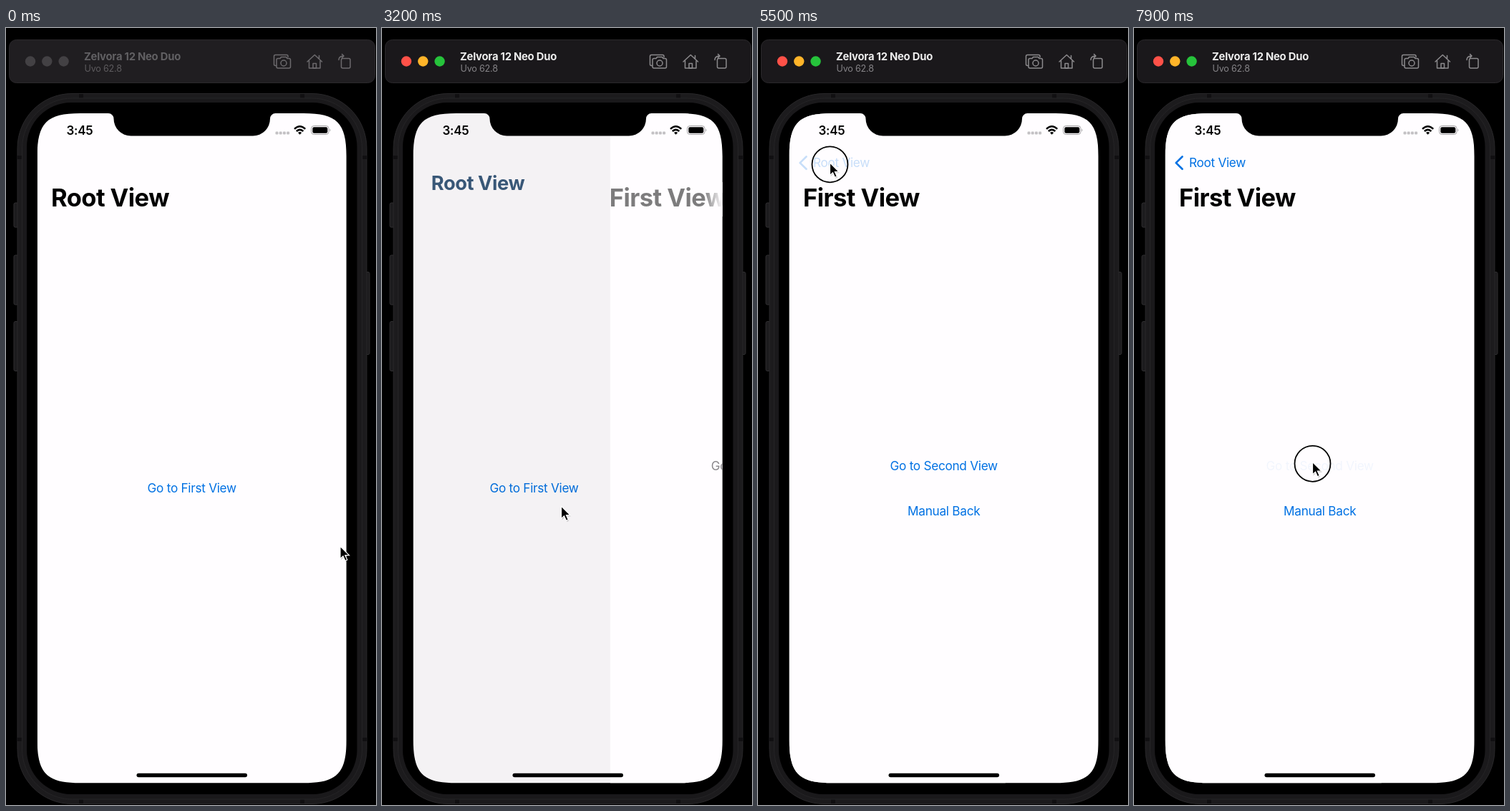
These frames come from a looping animation (517x1084 px, 8000 ms). An HTML page:

```html
<!DOCTYPE html>
<html lang="en">
<head>
<meta charset="utf-8">
<title>Navigation demo</title>
<style>
  html, body { margin: 0; width: 100%; height: 100%; overflow: hidden; background: #000; }
  svg { display: block; width: 517px; height: 1084px; }
  text { font-family: Inter, Roboto, sans-serif; font-size: 17.2px; letter-spacing: -.016em; }
  .link { fill: #0071e3; text-anchor: middle; }
  .large { font-size: 34.5px; font-weight: 700; }
  .icons { fill: none; stroke-width: 1.5; stroke-linejoin: round; stroke-linecap: round; }
</style>
</head>
<body>
<svg viewBox="0 0 517 1084">
  <defs>
    <clipPath id="screen">
      <path d="M43.700 179c0-46.700 13.300-60 60-60h312c46.700 0 60 13.300 60 60V993.300c0 46.700-13.300 60-60 60h-312c-46.700 0-60-13.300-60-60z"/>
    </clipPath>
    <linearGradient id="fade">
      <stop stop-color="#fffdff" stop-opacity="0"/>
      <stop offset="1" stop-color="#fffdff"/>
    </linearGradient>
  </defs>
  <rect width="517" height="1084"/>

  <!-- window bar -->
  <rect id="bar" x="4.500" y="16.500" width="511" height="60" rx="10" stroke="#2b292c"/>
  <g id="lights"><circle cx="34" cy="46.500" r="7.200"/><circle cx="57.300" cy="46.500" r="7.200"/><circle cx="80.600" cy="46.500" r="7.200"/></g>
  <text id="device" x="109" y="44.500" style="font-size:14.8px;font-weight:700">Zelvora 12 Neo Duo</text>
  <text id="system" x="109.500" y="61" style="font-size:12.600px">Uvo 62.8</text>
  <g id="icons" class="icons">
    <path d="M377.500 52.500h-1q-2 0-2-2V39.500q0-2 2-2h15.500q2 0 2 2v1"/>
    <path d="M380 42.500h3l1.500-2h7l1.500 2h2.500q2 0 2 2v9.500q0 2-2 2h-15.500q-2 0-2-2v-9.500q0-2 2-2z"/>
    <circle cx="388" cy="49" r="4"/>
    <path d="M421 47l10.300-9.500 10.200 9.500M423.500 45.500V56h15.500V45.500M437.500 42.500v-4"/>
    <path d="M429 56v-6.500h4.500V56z"/>
    <rect x="468.500" y="42.500" width="12.500" height="13.500" rx="2"/>
    <path d="M465 44.500q0-5 6.500-5.500M469.500 36.500l2.500 2.500-2.500 2.500"/>
  </g>

  <!-- phone body -->
  <g fill="#1c1b1d" stroke="#302f31">
    <rect x="11" y="244" width="8" height="34" rx="2"/>
    <rect x="11" y="317" width="8" height="69" rx="2"/>
    <rect x="11" y="409.500" width="8" height="69" rx="2"/>
    <rect x="500" y="340.500" width="8" height="115" rx="2"/>
    <rect x="16" y="91.500" width="488" height="991" rx="76" stroke="#29282a"/>
  </g>
  <path d="M102 92h6v6h-6zM411 92h6v6h-6zM102 1076h6v6h-6zM411 1076h6v6h-6zM16 178h6v5h-6zM16 990h6v5h-6zM498 178h6v5h-6zM498 990h6v5h-6z" fill="#111012"/>
  <rect x="22.500" y="98" width="475" height="978" rx="70" fill="#1a191b" stroke="#252426"/>
  <rect x="29" y="104" width="461.500" height="965" rx="62"/>

  <!-- app -->
  <g clip-path="url(#screen)">
    <g id="rootPage">
      <rect x="43.700" y="119" width="432" height="935" fill="#fffdff"/>
      <text id="goFirst" class="link" x="259.700" y="648.300">Go to First View</text>
    </g>
    <rect id="dim" x="43.700" y="119" width="432" height="935"/>
    <g id="firstPage">
      <rect x="43.700" y="119" width="432" height="935" fill="#fffdff"/>
      <text id="goSecond" class="link" x="259.700" y="616.500">Go to Second View</text>
      <text id="manual" class="link" x="259.700" y="679.500">Manual Back</text>
    </g>
    <text id="firstTitle" class="large" x="63" y="248.600">First View</text>
    <rect id="edge" x="450" y="215" width="26" height="48" fill="url(#fade)"/>
    <g id="back">
      <path id="chevron" d="M67.500 179.500l-8.800 8.600 8.800 8.600" fill="none" stroke="#0071e3" stroke-width="2.700" stroke-linecap="round" stroke-linejoin="round"/>
      <text id="label">Root View</text>
    </g>
    <!-- notch, status and home indicator -->
    <path d="M143 118v1a7.500 7.500 0 0 1 7.500 7.500a24 24 0 0 0 24 24h170.500a24 24 0 0 0 24-24a7.500 7.500 0 0 1 7.500-7.500v-1z"/>
    <text x="84.500" y="149" style="font-size:17px;font-weight:600">3:45</text>
    <g fill="#c3c1c4">
      <rect x="376.500" y="144.500" width="4" height="4" rx="1.300"/><rect x="381.700" y="144.500" width="4" height="4" rx="1.300"/>
      <rect x="386.900" y="144.500" width="4" height="4" rx="1.300"/><rect x="392.100" y="144.500" width="4" height="4" rx="1.300"/>
    </g>
    <g fill="none" stroke="#000" stroke-width="2.500">
      <path d="M403 140.800q7.600-7 15.200 0M405.800 144q4.800-4.300 9.600 0"/>
      <path d="M408 145.900q2.600-2 5.200 0l-2.600 2.900z" fill="#000" stroke="none"/>
    </g>
    <rect x="426.500" y="136.500" width="24.500" height="12" rx="3.800" fill="none" stroke="#a3a1a4"/>
    <rect x="428.300" y="138.300" width="21" height="8.400" rx="2.200"/>
    <path d="M452.500 140.500q2 2 0 4z" fill="#a3a1a4"/>
    <rect x="182.500" y="1039.800" width="154.500" height="5.400" rx="2.700"/>
  </g>

  <g id="pointer">
    <circle id="ring" cy="2.300" r="25" fill="none" stroke="#000" stroke-width="1.800"/>
    <path d="M0 0V17.500l4-3.800 2.900 6.600 2.900-1.300-2.900-6.300h5.600z" transform="translate(1 1.500)" opacity=".2"/>
    <path d="M0 0V17.500l4-3.800 2.900 6.600 2.900-1.300-2.900-6.300h5.600z" stroke="#fff" stroke-width="1.200"/>
  </g>
</svg>
<script>
const LOOP = 8000, STEP = 100, ACTIVE_FROM = 1400;
const el = id => document.getElementById(id);
const set = (id, attrs) => { for (const k in attrs) el(id).setAttribute(k, attrs[k]); };
const shift = (id, x, y = 0) => set(id, { transform: `translate(${x} ${y})` });
const mix = (a, b, u) => a + (b - a) * u;

// start time and whether the first page comes in
const transitions = [[1500, true], [3086, false], [4235, true], [5550, false], [7150, true]];
// start, end, pressed element, opacity while pressed
const presses = [
  [1400, 1500, "goFirst", .1], [2900, 3086, "manual", .1], [4100, 4235, "goFirst", .1],
  [5400, 5550, "back", .22], [7000, 7150, "goFirst", .1], [7900, 8000, "goSecond", .05]
];
// time, x, y of the pointer tip
const path = [
  [0, 467, 723], [250, 330, 620], [450, 130, 571], [600, 89, 600], [900, 226, 629],
  [1200, 250, 642], [2200, 250, 642], [2800, 250.5, 667], [3400, 250.5, 667],
  [4000, 247, 636], [4900, 247, 636], [5350, 100.5, 188], [5800, 100.5, 188],
  [6700, 238, 632], [7200, 238, 632], [7800, 249.5, 605.5], [8000, 249.5, 605.5]
];

function pointerAt(t) {
  const i = path.findIndex(p => p[0] > t);
  const [t0, x0, y0] = path[i - 1], [t1, x1, y1] = path[i];
  const u = (t - t0) / (t1 - t0), s = u * u * (3 - 2 * u);
  return [mix(x0, x1, s), mix(y0, y1, s)];
}

// critically damped spring; rootness is 1 on the root page, 0 on the first page
function navigationAt(t) {
  const last = transitions.filter(([start]) => start <= t).pop();
  if (!last) return { rootness: 1, popping: false };
  const [start, pushing] = last, w = (t - start) * .019;
  const rest = (1 + w) * Math.exp(-w);
  return { rootness: pushing ? rest : 1 - rest, popping: !pushing };
}

function drawWindow(active) {
  set("bar", { fill: active ? "#1a181b" : "#201e21" });
  set("device", { fill: active ? "#ededed" : "#616063" });
  set("system", { fill: active ? "#858387" : "#5d5b5e" });
  set("icons", { stroke: active ? "#8c8a8d" : "#6c6a6d" });
  ["#ff5148", "#ffb429", "#26c33b"].forEach((color, i) =>
    el("lights").children[i].setAttribute("fill", active ? color : "#434144"));
}

// the back button label grows into the large root title
function drawLabel(q) {
  const p = 1 - q, grown = q ** 1.2;
  set("label", { x: mix(76.9, 63, grown), y: mix(194.3, 248.6, grown), opacity: 1 - q * p });
  Object.assign(el("label").style, {
    fill: `rgb(0 ${113 * p} ${227 * p})`,
    fontSize: mix(17.2, 34.5, grown) + "px",
    fontWeight: q > .2 ? 700 : 400
  });
}

function drawPages({ rootness: q, popping }) {
  const p = 1 - q;
  shift("rootPage", -130 * p);
  set("dim", { opacity: .12 * p });
  shift("firstPage", 432 * q);
  shift("firstTitle", 400 * q);
  set("firstTitle", { opacity: Math.min(1, p * 1.4) });
  set("edge", { opacity: q > .1 && q < .95 ? 1 : 0 });
  for (const id of ["goSecond", "manual"]) el(id).style.fill = popping ? "#89878a" : "";
  shift("chevron", 60 * q);
  set("chevron", { opacity: Math.max(0, 1 - 6 * q) });
  drawLabel(q);
}

function drawPointer(t) {
  const press = presses.find(([from, to]) => t >= from && t < to);
  for (const id of ["goFirst", "goSecond", "manual", "back"])
    set(id, { opacity: press && press[2] === id ? press[3] : 1 });
  set("ring", { opacity: press ? 1 : 0 });
  shift("pointer", ...pointerAt(t));
}

function frame() {
  const t = Math.floor(performance.now() % LOOP / STEP) * STEP;
  drawWindow(t >= ACTIVE_FROM);
  drawPages(navigationAt(t));
  drawPointer(t);
  requestAnimationFrame(frame);
}
frame();
</script>
</body>
</html>
```
